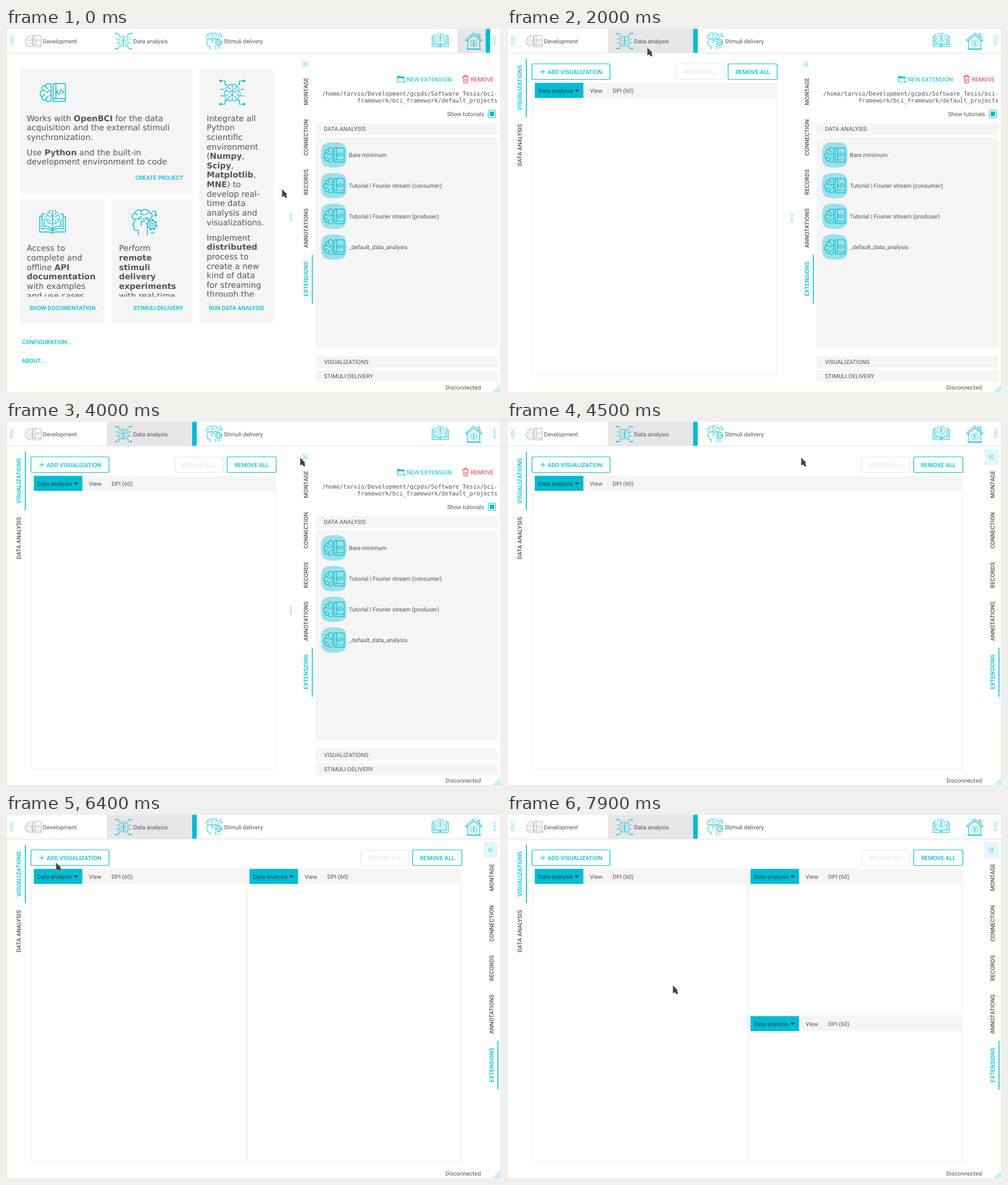
Animation of 872x642 px, one loop 8000 ms. Source, as an HTML page:

```html
<!DOCTYPE html>
<html lang="en">
<head>
<meta charset="utf-8">
<title>Data analysis workspace</title>
<style>
  html, body { margin: 0; width: 100%; height: 100%; overflow: hidden; background: #fff; }
  svg { display: block; width: 100%; height: 100%; }
  text { font: 10.25px Roboto, sans-serif; fill: #555; text-rendering: geometricPrecision; white-space: pre; }
  .strong { font-weight: 500; }
  .bold { font-weight: 700; }
  .body { font: 14.25px "DejaVu Sans", sans-serif; }
  .mono { font: 10.27px "DejaVu Sans Mono", monospace; }
  .cyan { fill: #00bcd4; }
  .red { fill: #dc3545; }
  .faint { fill: #e6e6e6; }
  .end { text-anchor: end; }
  .mid { text-anchor: middle; }
  .line { fill: none; stroke: currentColor; stroke-linejoin: round; stroke-linecap: round; }
  symbol { overflow: visible; }
  #add.pressed rect { fill: #00bcd4; }
  #add.pressed text { fill: #fff; }
  #add.pressed path { color: #fff !important; }
</style>
</head>
<body>
<svg id="stage" viewBox="0 0 872 642">
  <defs>
    <g id="half">
      <path d="M0-13C-2-18-9-17-10-12C-15-13-18-8-16-4C-21-2-21 5-17 7C-18 12-13 15-10 13C-8 18-2 17 0 13Z"/>
      <path d="M-10-12q0 4 4 5M-16-4q5-1 6 3M-17 7q4 0 5-4M-10 13q0-5 5-5M0-3h-4q-3 0-3 4M0 5h-3"/>
    </g>
    <g id="brain"><use href="#half"/><use href="#half" transform="scale(-1 1)"/></g>
    <symbol id="code" viewBox="0 0 48 48"><g class="line" stroke-width="1.5">
      <use href="#half" x="21.5" y="24"/>
      <path d="M25 8H44a3 3 0 0 1 3 3V40H25ZM30 8V35M25 35H47M34 20l-3 3 3 3M41 20l3 3-3 3M39 18l-3 10"/>
    </g></symbol>
    <symbol id="net" viewBox="0 0 48 48"><g class="line" stroke-width="1.4">
      <use href="#brain" transform="translate(24 24) scale(.72 .92)"/>
      <path d="M5 3h6v7h3M43 3h-6v7h-3M5 45h6v-7h3M43 45h-6v-7h-3M3 18h6M45 18h-6M3 30h6M45 30h-6"/>
      <g fill="currentColor"><circle cx="3" cy="3" r="1.6"/><circle cx="45" cy="3" r="1.6"/><circle cx="3" cy="45" r="1.6"/><circle cx="45" cy="45" r="1.6"/></g>
    </g></symbol>
    <symbol id="head" viewBox="0 0 48 48"><g class="line" stroke-width="1.5">
      <path d="M8 18C0 18-1 9 6 8C7 2 15 0 19 3C24-1 32 1 33 6C40 8 39 17 32 18Z"/>
      <path d="M6 8q4-1 5 3M19 3q-4 4 0 7h5M33 6q-5 0-6 4M14 18q0-4 5-4M30 18q0-3-4-3"/>
      <path d="M7 18c0 4-2 6-4 9c-1 2 0 2 2 2v6c0 3 2 3 8 3v9M29 37v10M38 4h6v8M42 10l2 3 2-3M25 22h-7v8M41 43h-6"/>
      <circle cx="37" cy="28" r="3.5"/><circle cx="37" cy="28" r="7.5"/>
      <circle cx="37" cy="28" r="9" stroke-dasharray="3.5 3.57" stroke-width="2" stroke-linecap="butt"/>
    </g></symbol>
    <symbol id="book" viewBox="0 0 48 48"><g class="line" stroke-width="1.5">
      <use href="#brain" transform="translate(24 14.5) scale(.62 .75)"/>
      <path d="M10 9H5V36C13 34 20 36 24 40C28 36 35 34 43 36V9H38M24 28V40M5 13H1V41H20q4 4 8 0H47V13H43"/>
      <path d="M9 18V31q9-1 15 6q6-7 15-6V18"/>
    </g></symbol>
    <symbol id="house" viewBox="0 0 48 48"><g class="line" stroke-width="1.7">
      <path d="M24 1L47 21l-3 3L24 7 4 24l-3-3ZM7 23V46H41V23M36 10V4h5v11M4 47H44"/>
      <use href="#brain" transform="translate(24 30) scale(.53 .6)"/>
    </g></symbol>
    <clipPath id="cardClip"><rect y="60" width="500" height="412.5"/></clipPath>
  </defs>
</svg>
<script>
const CYAN = '#00bcd4', PALE = '#f5f5f5', GREY = '#e6e6e6', COLLAPSE_SHIFT = 327;
const LOOP = 8000;

const box = (x, y, w, h, fill, extra = '') =>
  `<rect x="${x}" y="${y}" width="${w}" height="${h}" fill="${fill}" ${extra}/>`;
// y is the middle of the capitals
const label = (x, y, s, cls = '', extra = '') =>
  `<text x="${x}" y="${y + 3.5}" class="${cls}" ${extra}>${s}</text>`;
const icon = (name, cx, cy, size, color = CYAN) =>
  `<use href="#${name}" x="${cx - size / 2}" y="${cy - size / 2}" width="${size}" height="${size}" style="color:${color}"/>`;
const line = (d, color = CYAN, width = 1.2) =>
  `<path class="line" d="${d}" style="color:${color}" stroke-width="${width}"/>`;
const group = (id, content) => `<g id="${id}">${content}</g>`;
const dot = (x, y) => box(x, y, 1.4, 1.4, CYAN);
const tile = (x, y) =>
  `<path transform="translate(${x} ${y})" fill="#9ce0e8" d="M0 22C0 4 4 0 22.5 0S45 4 45 22 41 44.5 22.5 44.5 0 40 0 22Z"/>`;
const tab = (x, cy, s, cls = '') =>
  label(0, 0, s, `strong mid ${cls}`, `transform="translate(${x} ${cy}) rotate(-90)"`);
const paragraph = (x, y, lines) => lines.split('|').map((s, i) =>
  `<text class="body" x="${x}" y="${y + i * 16.63}">${s.replace(/\*(.+?)\*/g, '<tspan class="bold">$1</tspan>')}</text>`).join('');

function grip(x) {
  let out = '';
  for (let row = 0; row < 6; row++)
    for (let col = row % 2; col < 3; col += 2) out += dot(x + col * 2, 14.5 + row * 2.9);
  return out;
}

function toolbar() {
  return box(0, 43.5, 872, 1, '#dedede') + grip(7.5) + grip(858) +
    group('homeActive', box(795.5, 1.5, 51, 42, GREY) + box(845, 1.5, 8, 42, CYAN)) +
    group('analysisHover', box(177.5, 1.5, 158.5, 42, GREY)) +
    group('analysisActive', box(328, 1.5, 8, 42, CYAN)) +
    icon('code', 47.5, 23, 30, '#aaa') + label(65, 23.5, 'Development') +
    group('analysisItem', icon('net', 207, 23, 30) + label(224, 23.5, 'Data analysis')) +
    icon('head', 366.5, 23, 30) + label(383.5, 23.5, 'Stimuli delivery') +
    icon('book', 765, 22, 30) + icon('house', 824, 23, 30);
}

function home() {
  const card = (x, y, w, h) => box(x, y, w, h, PALE, 'rx="3"');
  return card(24, 73, 304.5, 217) + card(24, 302, 150, 216.5) + card(186, 302, 142.5, 216.5) + card(340.5, 73, 130.5, 445.5) +
    icon('code', 82, 113.5, 47) + icon('net', 398.5, 113.5, 47) +
    icon('book', 82, 342, 47) + icon('head', 244, 342, 47) +
    '<g clip-path="url(#cardClip)">' +
    paragraph(36.5, 163.7, 'Works with *OpenBCI* for the data|acquisition and the external stimuli|synchronization.') +
    paragraph(36.5, 223.7, 'Use *Python* and the built-in|development environment to code') +
    paragraph(36.5, 392.4, 'Access to|complete and|offline *API*|*documentation*|with examples|and use cases') +
    paragraph(199, 392.4, 'Perform|*remote*|*stimuli*|*delivery*|*experiments*|with real-time') +
    paragraph(353.5, 163.7, 'Integrate all|Python|scientific|environment|(*Numpy*,|*Scipy*,|*Matplotlib*,|*MNE*) to|develop real-|time data|analysis and|visualizations.') +
    paragraph(353.5, 373.7, 'Implement|*distributed*|process to|create a new|kind of data|for streaming|through the') + '</g>' +
    label(312, 263, 'CREATE PROJECT', 'strong cyan end') +
    label(157.7, 492, 'SHOW DOCUMENTATION', 'strong cyan end') +
    label(312, 492, 'STIMULI DELIVERY', 'strong cyan end') +
    label(454.5, 492, 'RUN DATA ANALYSIS', 'strong cyan end') +
    label(28, 552, 'CONFIGURATION...', 'strong cyan') + label(28, 585.3, 'ABOUT...', 'strong cyan');
}

function pane(x, y, w, h) {
  return box(x + 1, y + 1, w - 2, h - 2, '#fff', `stroke="${PALE}" stroke-width="2"`) +
    box(x, y, w, 26.5, PALE) + box(x + 5, y, 85.5, 26.5, CYAN) +
    label(x + 11, y + 14, 'Data analysis', '', 'style="fill:#31474c"') +
    `<path d="M${x + 75} ${y + 11.5}h8l-4 4.5z" fill="#31474c"/>` +
    label(x + 102, y + 14, 'View') + label(x + 142, y + 14, 'DPI (60)');
}

function workspace() {
  const top = 96.5, full = 516, rightX = 424, lower = 355.5;
  const leftHalf = pane(44, top, 380.5, full);
  const layouts = [
    pane(44, top, 432, full),
    pane(44, top, 759, full),
    leftHalf + pane(rightX, top, 379, full),
    leftHalf + pane(rightX, top, 379, lower - top) + pane(rightX, lower, 379, top + full - lower),
  ];
  const frame = (x, w, color) => box(x, 63, w, 27.5, '#fff', `rx="2.5" stroke="${color}" stroke-width="1.2"`);
  return tab(22, 105.5, 'VISUALIZATIONS', 'cyan') + tab(22, 206, 'DATA ANALYSIS') + box(33.3, 54, 1.6, 103, CYAN) +
    group('add', frame(44, 137.5, CYAN) + line('M59 77h8M63 73v8') + label(71.5, 77, 'ADD VISUALIZATION', 'strong cyan')) +
    group('actions', frame(298, 85, GREY) + label(340.5, 77, 'RELOAD ALL', 'strong faint mid') +
      frame(389.5, 86.5, CYAN) + label(433, 77, 'REMOVE ALL', 'strong cyan mid')) +
    layouts.map((panes, i) => group('layout' + i, panes)).join('');
}

function rail() {
  return group('chevronBg', box(514, 49, 25.5, 28.5, '#e3f7fa', 'rx="2"')) +
    group('openChevron', line('M523 59.5l3.5 4-3.5 4M527 59.5l3.5 4-3.5 4', CYAN, 1)) +
    group('closedChevron', line('M526 59.5l-3.5 4 3.5 4M530 59.5l-3.5 4 3.5 4', CYAN, 1)) +
    tab(528, 111.5, 'MONTAGE') + tab(528, 192.5, 'CONNECTION') + tab(528, 271, 'RECORDS') +
    tab(528, 352, 'ANNOTATIONS') + tab(528, 441.5, 'EXTENSIONS', 'cyan') + box(538.8, 399, 1.6, 86, CYAN);
}

function extensions() {
  const header = (y, s) => box(545, y, 321, 21, PALE, 'rx="2"') + label(560, y + 10.5, s);
  const items = ['Bare minimum', 'Tutorial | Fourier stream (consumer)', 'Tutorial | Fourier stream (produser)', '_default_data_analysis'];
  let dots = '';
  for (let i = 0; i < 6; i++) dots += dot(501.3, 326 + i * 2.7);
  return dots +
    line('M697 95H689.5V84.5h4l1 2h7V91M699 94.5h4.5M701.2 92.2v4.6', CYAN, 1) + box(689.5, 85.5, 12, 3, CYAN) +
    label(706, 90, 'NEW EXTENSION', 'cyan') +
    line('M804 85.5h11M807.5 85v-2h4v2M805.5 86l.7 10.5h7l.7-10.5M808.3 89v5M811 89v5', '#dc3545', 1) +
    label(818.5, 90, 'REMOVE', 'red') +
    label(866, 115, '/home/tarvio/Development/gcpds/Software_Tesis/bci-', 'mono end') +
    label(866, 127, 'framework/bci_framework/default_projects', 'mono end') +
    label(777, 151, 'Show tutorials') +
    box(849.5, 144.5, 13, 13, '#fff', `rx="1" stroke="${CYAN}"`) + box(852, 147, 8, 8, CYAN) +
    header(167, 'DATA ANALYSIS') + box(545, 192, 321, 371, PALE, 'rx="3"') +
    items.map((s, i) => tile(555, 201 + i * 54) +
      icon('code', 577.5, 223.3 + i * 54, 38) + label(604, 223.6 + i * 54, s)).join('') +
    header(576.5, 'VISUALIZATIONS') + header(601.5, 'STIMULI DELIVERY');
}

function statusBar() {
  let dots = '';
  for (let row = 0; row < 4; row++)
    for (let col = 3 - row; col < 4; col++) dots += dot(859.5 + col * 2.9, 629.5 + row * 2.9);
  return label(774, 632, 'Disconnected') + dots;
}

const stage = document.getElementById('stage');
stage.insertAdjacentHTML('beforeend',
  box(.5, .5, 871, 641, '#fff', `stroke="${GREY}"`) + toolbar() + group('home', home()) + group('workspace', workspace()) +
  group('rail', rail()) + group('extensions', extensions()) + statusBar() +
  group('arrow', '<path d="M0 0L9.3 9.3 7.8 10.5 9.6 15 6.4 16.6 4 12.8 0 14.6Z" fill="#444" stroke="#fff" stroke-width=".5"/>') +
  group('resize', line('M0-7V7M-7 0H7M-4-3L-7 0l3 3M4-3l3 3-3 3', '#444', 1.3)));

const el = {};
stage.querySelectorAll('g[id]').forEach(g => el[g.id] = g);
const show = (id, on) => el[id].style.display = on ? '' : 'none';
const move = (id, x, y) => el[id].setAttribute('transform', `translate(${x} ${y})`);

// Pointer stops: time, x, y
const pointer = [
  [0, 486, 283], [700, 468, 264], [800, 408, 202], [900, 348, 139], [1000, 300, 88], [1100, 269, 56], [1200, 254, 40],
  [1300, 249, 36], [1400, 247, 34], [3400, 510, 88], [3500, 528, 120], [3600, 540, 132], [3700, 536, 114],
  [3800, 528, 92], [3900, 521, 73], [4000, 518, 64], [5000, 430, 75], [5100, 290, 91], [5200, 180, 101],
  [5300, 139, 101], [5500, 89, 92], [5600, 101, 101], [5800, 94, 95], [5900, 88, 85], [7800, 200, 200], [7900, 292, 301],
];

function draw(t) {
  const working = t >= 2000, collapsed = t >= 4500;
  const layout = t < 4500 ? 0 : t < 6400 ? 1 : t < 7600 ? 2 : 3;
  const resizing = t >= 3400 && t < 3500;
  const shift = collapsed ? COLLAPSE_SHIFT : 0;
  const [, x, y] = pointer.findLast(stop => stop[0] <= t);

  show('homeActive', !working);
  show('home', !working);
  show('workspace', working);
  show('analysisHover', t >= 1200);
  show('analysisActive', working);
  move('analysisItem', 0, t >= 1800 && t < 2000 ? 5 : 0);

  show('extensions', !collapsed);
  show('openChevron', !collapsed);
  show('closedChevron', collapsed);
  show('chevronBg', t >= 4300);
  move('rail', shift, 0);
  move('actions', shift, 0);
  for (let i = 0; i < 4; i++) show('layout' + i, i === layout);
  el.add.classList.toggle('pressed', (t >= 6300 && t < 6400) || (t >= 7400 && t < 7600));

  show('arrow', !resizing);
  show('resize', resizing);
  move('arrow', x, y);
  move('resize', x, y);
}

const start = performance.now();
function tick() {
  draw((performance.now() - start) % LOOP);
  requestAnimationFrame(tick);
}
tick();
</script>
</body>
</html>
```
